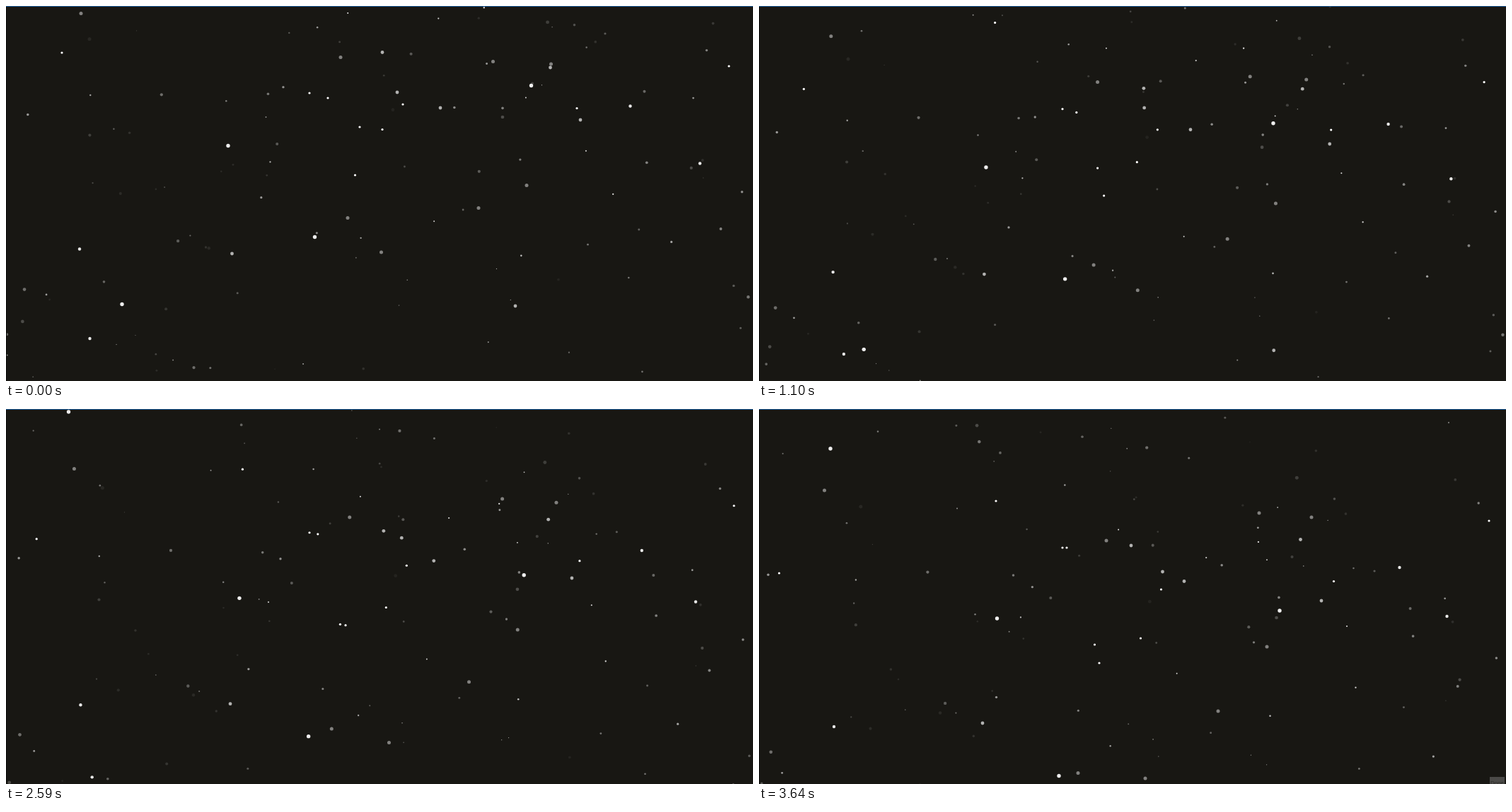
These frames come from a looping animation (1056 px wide and 530 px high, 3710 ms). An HTML page with a canvas:

```html
<!DOCTYPE html>
<html lang="en">
<head>
<meta charset="utf-8">
<title>Drifting stars</title>
<style>
  html, body { margin: 0; width: 100%; height: 100%; overflow: hidden; background: #181713; }
  canvas { display: block; width: 1056px; height: 530px; }
</style>
</head>
<body>
<canvas id="sky" width="1056" height="530"></canvas>
<script>
const W = 1056, H = 530, LOOP = 3710, LAST = 55;
const ctx = document.getElementById('sky').getContext('2d');

// The field advances in uneven ticks: [tick, ms]
const ticks = [[0, 0], [9, 570], [12, 770], [17, 1100], [26, 1700], [33, 2160], [34, 2230],
  [39, 2590], [40, 2630], [41, 2690], [42, 2780], [50, 3300], [55, 3640], [56, LOOP]];

// Main stars: x, y at the first tick, x, y at the last; optional tick and x of a bounce
const groups = [
  { r: 2.7, a: .93, stars: [
    [314, 197.5, 336.5, 296], [742.5, 112.5, 736, 285, 17, 727], [164, 421.5, 113, 628],
    [58, -123, 101, 56], [436.5, 326.5, 424, 518.5]] },
  { r: 2.2, a: .9, stars: [
    [104, 343.5, 106, 449], [118.5, 470, 123, 541], [981, 222.5, 972.5, 293],
    [882.5, 141.5, 905.5, 224]] },
  { r: 2.4, a: .67, stars: [
    [614, 144, 601, 243.5], [812, 161, 795, 271], [319.5, 350, 316, 444],
    [769.5, 87, 765.5, 184.5], [720, 424, 745, 627], [532, 65.5, 570.5, 230],
    [553, 122, 526, 193]] },
  { r: 2.5, a: .46, stars: [
    [530.5, 348, 546, 522], [483, 299.5, 451, 514.5], [473, 72.5, 491, 186],
    [736, 253.5, 718, 336], [668, 285.5, 649, 427], [688.5, 78.5, 707, 147],
    [106, 10.5, 92.5, 115], [770.5, 82, 781, 153]] },
  { r: 1.6, a: 1, stars: [
    [500, 171, 481, 359, 27, 466], [493.5, 239, 474.5, 333], [79, 66, 28.5, 232],
    [429, 123, 429, 196], [455, 130, 435, 196], [561, 139, 568.5, 255],
    [532, 174.5, 539.5, 324], [1022, 85, 1032, 158], [807, 144.5, 812.5, 243.5],
    [333, -24, 335, 130]] }
];

function seeded(s) {
  return () => (s = (s * 16807) % 2147483647) / 2147483647;
}

const rand = seeded(4711);
const dust = Array.from({ length: 105 }, () => {
  const r = .5 + rand() * 2;
  return {
    r, a: (.08 + .9 * rand()) * Math.min(1, 1 / r),
    x: rand() * W, y: rand() * H,
    vx: (rand() - .5) * 1.2, vy: 1.2 + rand() * 2.3
  };
});

const mix = (a, b, k) => a + (b - a) * k;
const wrap = (v, n) => ((v % n) + n) % n;

function tickAt(ms) {
  let i = ticks.length - 2;
  while (ticks[i][1] > ms) i--;
  const [n0, t0] = ticks[i], [n1, t1] = ticks[i + 1];
  return Math.floor(mix(n0, n1, (ms - t0) / (t1 - t0)) + 1e-3);
}

function dot(x, y, r, a) {
  ctx.globalAlpha = a;
  ctx.beginPath();
  ctx.arc(x, y, r, 0, Math.PI * 2);
  ctx.fill();
}

function drawStar([x0, y0, x1, y1, turn, xt], n, r, a) {
  let x = mix(x0, x1, n / LAST);
  if (turn) x = n < turn ? mix(x0, xt, n / turn) : mix(xt, x1, (n - turn) / (LAST - turn));
  dot(x, mix(y0, y1, n / LAST), r, a);
}

function drawDust(d, n) {
  const span = H + 8, y = d.y + d.vy * n + 4;
  const x = d.x + d.vx * n + Math.floor(y / span) * 311;
  dot(wrap(x, W), wrap(y, span) - 4, d.r, d.a);
}

function drawPointer(x, y) {
  ctx.beginPath();
  [[0, 0], [0, 9], [2, 7.3], [3.6, 10.5], [5, 9.9], [3.6, 6.6], [6.2, 6.4]]
    .forEach(([dx, dy]) => ctx.lineTo(x + dx, y + dy));
  ctx.closePath();
  ctx.strokeStyle = '#000';
  ctx.stroke();
  ctx.fill();
}

function drawButton() {
  ctx.fillStyle = '#4b4a48';
  ctx.fillRect(1033, 520, 21, 10);
  ctx.fillStyle = '#2b2a28';
  ctx.font = '8px "Liberation Sans", sans-serif';
  ctx.textAlign = 'center';
  ctx.fillText('Done', 1043.5, 531);
}

function draw(ms) {
  const n = tickAt(ms);
  ctx.globalAlpha = 1;
  ctx.fillStyle = '#181713';
  ctx.fillRect(0, 0, W, H);
  ctx.fillStyle = '#fff';
  dust.forEach(d => drawDust(d, n));
  groups.forEach(g => g.stars.forEach(s => drawStar(s, n, g.r, g.a)));
  ctx.globalAlpha = 1;
  if (n === 26) drawPointer(595, 167.5);
  if (n === LAST) drawButton();
  ctx.fillStyle = '#0c0c0b';
  ctx.fillRect(0, 1, 1, H);
  ctx.fillStyle = '#1f619f';
  ctx.fillRect(0, 0, W, 1);
}

const start = performance.now();
function loop() {
  draw((performance.now() - start) % LOOP);
  requestAnimationFrame(loop);
}
loop();
</script>
</body>
</html>
```
